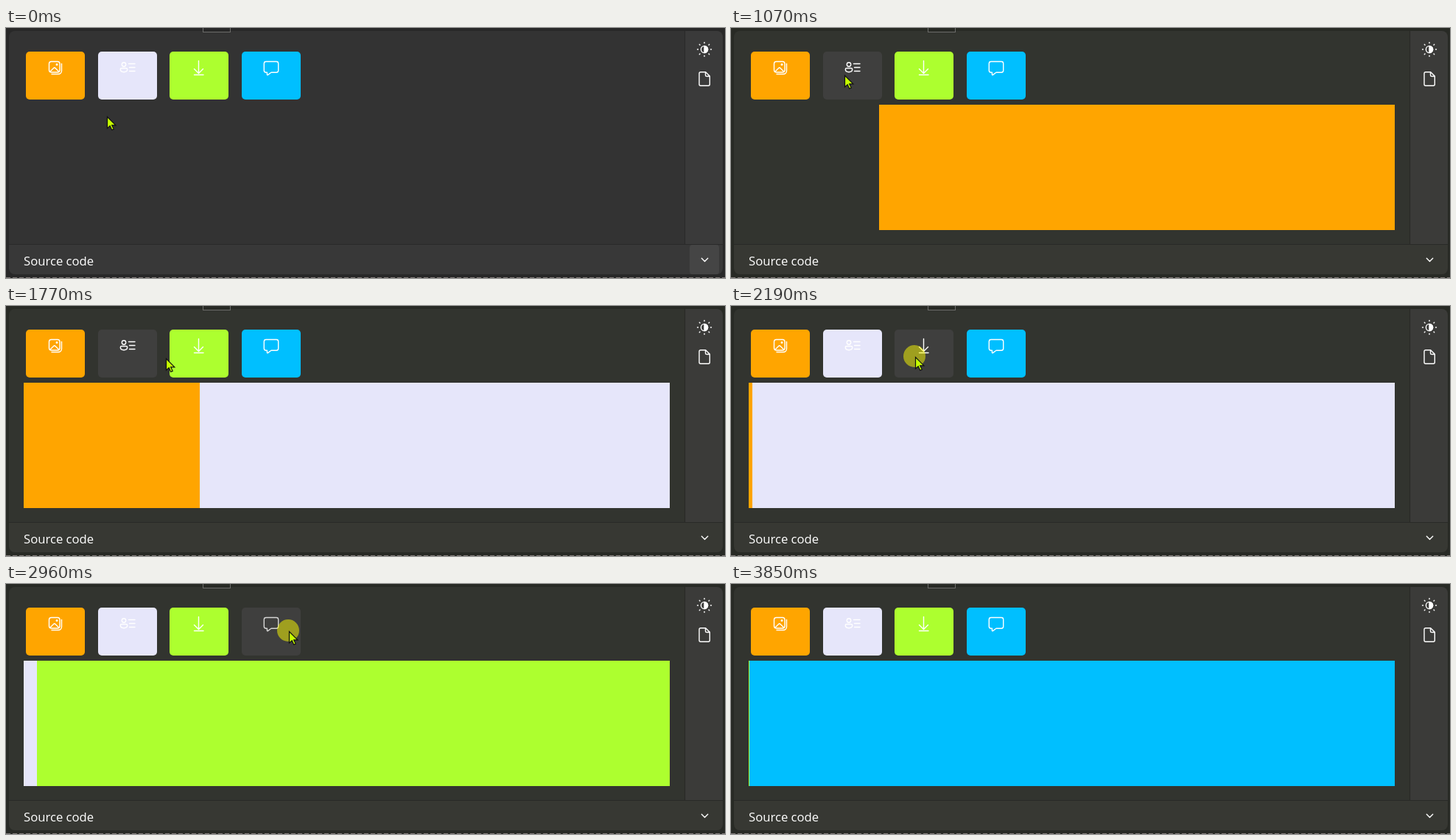
Animation of 976 by 339 pixels, one loop 3920 ms. Source, as an HTML page:

```html
<!DOCTYPE html>
<html lang="en">
<head>
<meta charset="utf-8">
<title>Colour panels</title>
<style>
  html, body { margin: 0; width: 100%; height: 100%; overflow: hidden; background: var(--edge); }
  :root { --edge: #282a25; --stage: #32342f; --side: #3b3b39; --bar: #373833; --line: #292a27; }
  :root.start { --edge: #282828; --stage: #333; --side: #3a3a3a; --bar: #383838; --line: #2a2a2a; }
  svg { display: block; width: 976px; height: 339px; }
  .icon { fill: none; stroke: #fff; stroke-width: 1.4; stroke-linecap: round; stroke-linejoin: round; }
  .tile.over > rect { fill: #3f3f3e; }
  .tile.down .icon { opacity: .78; }
  text { font: 16.7px "Open Sans", "Noto Sans", sans-serif; fill: #fff; }
</style>
</head>
<body>
<svg viewBox="0 0 976 339">
  <defs>
    <clipPath id="card"><rect x="4" y="4" width="969" height="330" rx="8"/></clipPath>
    <clipPath id="view"><rect x="24" y="104" width="877" height="170"/></clipPath>
  </defs>
  <rect width="976" height="339" fill="var(--edge)"/>
  <g clip-path="url(#card)">
    <rect x="4" y="4" width="918" height="290" fill="var(--stage)"/>
    <rect x="922" y="4" width="51" height="290" fill="var(--side)"/>
    <rect x="4" y="293" width="969" height="41" fill="var(--bar)"/>
    <path d="M921.5 4V293M4 293.5H973" stroke="var(--line)" stroke-width="1.2"/>
  </g>
  <rect x="267.5" y="-5" width="37" height="10.5" fill="var(--edge)" stroke="#6c6c6a"/>
  <path d="M0 338.5H976" stroke="#817b79" stroke-dasharray="6 3"/>

  <rect id="glow" x="928" y="294" width="40" height="40" rx="4" fill="#454545"/>
  <path class="icon" d="M944.3 312.3l4.2 4.2 4.2-4.2"/>
  <text x="24" y="322">Source code</text>

  <g class="icon">
    <circle cx="948" cy="29" r="4.6"/>
    <path d="M948 24.4a4.6 4.6 0 0 1 0 9.2z" fill="#fff"/>
    <g id="rays"></g>
    <path d="M943 59.7h6.7l5.6 5.6v11a2 2 0 0 1-2 2h-10.3a2 2 0 0 1-2-2v-14.600a2 2 0 0 1 2-2zM949.500 59.900v4a1.600 1.600 0 0 0 1.600 1.600h4"/>
  </g>

  <g class="tile">
    <rect x="27" y="32" width="80" height="65" rx="5" fill="orange"/>
    <g class="icon">
      <rect x="58.500" y="45.500" width="14.500" height="14.500" rx="3"/>
      <path d="M75.500 48.500v9.500a4.500 4.500 0 0 1-4.500 4.500h-9M60 59l4.500-4.500q1.300-1.300 2.600 0l4.500 4.500"/>
      <circle cx="69" cy="49.500" r=".8"/>
    </g>
  </g>
  <g class="tile">
    <rect x="125" y="32" width="80" height="65" rx="5" fill="lavender"/>
    <g class="icon">
      <circle cx="160" cy="49.500" r="2.700"/>
      <path d="M157 54.500h6q1.700 0 1.700 1.600c0 2.500-2 3.600-4.700 3.600s-4.700-1.100-4.700-3.600q0-1.600 1.700-1.600zM166.500 48.500h8.500M167.500 53.500h7.500M167.500 58.500h7.500"/>
    </g>
  </g>
  <g class="tile">
    <rect x="222" y="32" width="80" height="65" rx="5" fill="greenyellow"/>
    <path class="icon" d="M261.500 44.500v16.500M255.500 55.500l6 6 6-6M255.500 63.500h12.500"/>
  </g>
  <g class="tile">
    <rect x="320" y="32" width="80" height="65" rx="5" fill="deepskyblue"/>
    <path class="icon" d="M353 45.500h14a2.700 2.700 0 0 1 2.700 2.700v9.300a2.700 2.700 0 0 1-2.700 2.700h-7l-4.600 3.400q-1 .6-1-.6v-2.800h-1.400a2.700 2.700 0 0 1-2.700-2.700v-9.300a2.700 2.700 0 0 1 2.700-2.700z"/>
  </g>

  <g clip-path="url(#view)">
    <rect class="panel" y="104" width="877" height="170" fill="orange"/>
    <rect class="panel" y="104" width="877" height="170" fill="lavender"/>
    <rect class="panel" y="104" width="877" height="170" fill="greenyellow"/>
    <rect class="panel" y="104" width="877" height="170" fill="deepskyblue"/>
  </g>

  <g id="pointer">
    <circle id="press" cx="-1" cy="-1" r="15" fill="#ff0" opacity=".5"/>
    <path d="M.5 .5v15.500l3.700-3.200 2.500 5.400 2.500-1.100-2.500-5.300h5.100z" fill="#c6ff00" stroke="#111" stroke-width="1.200"/>
  </g>
</svg>
<script>
const LOOP = 3920;
const LEFT = 24, WIDTH = 877;

// One entry per tile: hover span, press span, panel start and duration.
const steps = [
  { over: [230, 930],   press: [560, 700],   start: 748,  time: 980 },
  { over: [930, 1830],  press: [1340, 1490], start: 1510, time: 940 },
  { over: [1830, 2500], press: [2140, 2300], start: 2350, time: 980 },
  { over: [2500, 3370], press: [2850, 3000], start: 3006, time: 1020 }
];

// Pointer stops: time, x, y.
const path = [
  [0, 137, 120], [330, 84, 64], [640, 86, 65], [800, 121, 71], [1000, 150, 64],
  [1300, 168, 62], [1450, 172, 63], [1560, 187, 73], [1980, 247, 69], [2190, 250, 69],
  [2340, 252, 69], [2660, 376, 64], [2960, 384, 64], [3040, 386, 67],
  [3300, 461, 186], [3560, 600, 345]
];

const $ = id => document.getElementById(id);
const tiles = document.querySelectorAll('.tile');
const panels = document.querySelectorAll('.panel');
const within = (t, [from, to]) => t >= from && t < to;
const clamp = v => Math.min(1, Math.max(0, v));

for (let i = 0; i < 8; i++) {
  const ray = document.createElementNS('http://www.w3.org/2000/svg', 'path');
  ray.setAttribute('d', 'M948 20.500v-1');
  ray.setAttribute('transform', `rotate(${i * 45} 948 29)`);
  $('rays').append(ray);
}

function pointerAt(t) {
  const next = path.findIndex(stop => stop[0] > t);
  if (next < 0) return [620, 360];
  const [t0, x0, y0] = path[next - 1], [t1, x1, y1] = path[next];
  const p = (t - t0) / (t1 - t0);
  return [x0 + (x1 - x0) * p, y0 + (y1 - y0) * p];
}

function render(t) {
  document.documentElement.classList.toggle('start', t < 70);
  $('glow').style.opacity = 1 - clamp((t - 70) / 150);
  steps.forEach(({ over, press, start, time }, i) => {
    tiles[i].classList.toggle('over', within(t, over));
    tiles[i].classList.toggle('down', within(t, press) && i === 3);
    const rest = (1 - clamp((t - start) / time)) ** 4;
    panels[i].setAttribute('x', Math.round(LEFT + WIDTH * rest));
  });
  const [x, y] = pointerAt(t);
  $('pointer').setAttribute('transform', `translate(${Math.round(x)} ${Math.round(y)})`);
  $('press').style.display = steps.some(s => within(t, s.press)) ? '' : 'none';
}

const origin = performance.now();
function tick() {
  render((performance.now() - origin) % LOOP);
  requestAnimationFrame(tick);
}
tick();
</script>
</body>
</html>
```
